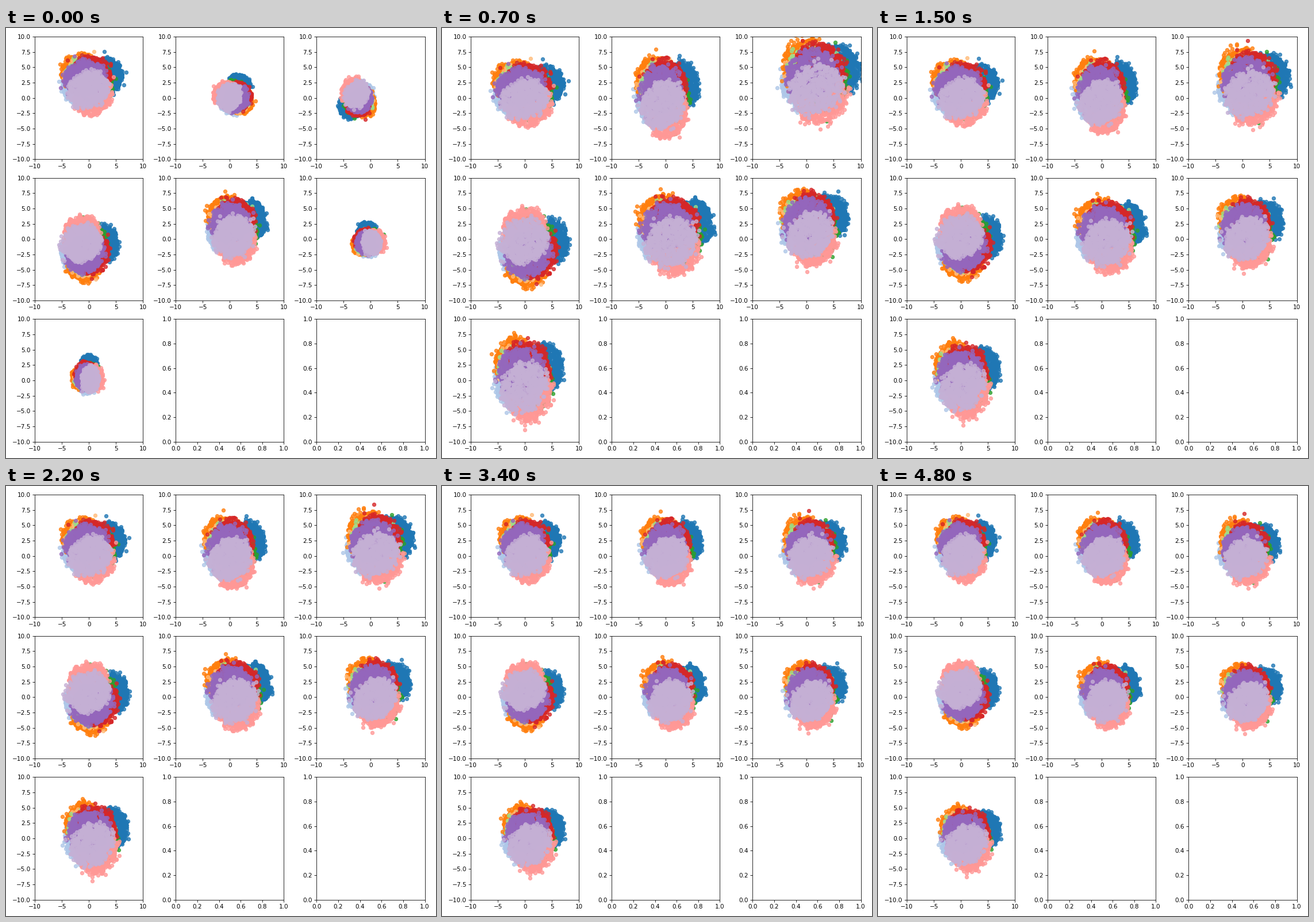
Write a matplotlib script that moves like this. It is 748x748 px and loops after 4900 ms.

```python
import numpy as np
import matplotlib.pyplot as plt
from matplotlib.animation import FuncAnimation

FRAMES, STEP = 49, 100
POINTS = 600
HUB = 0.3
REST_HALF = 5.4 + 5.2j
ANCHORS = np.array([4 + 1.6j, -1.4 - 0.2j, -0.9 + 2.4j, -0.1 + 1.7j,
                    2.2 - 0.3j, 0.4 + 1.6j, 1.3 + 1.8j, 1.5 - 2j,
                    0.1 + 1j, 0.6 - 0.8j])[:, None]

rng = np.random.default_rng(7)
colors = plt.get_cmap("tab20").colors[:len(ANCHORS)]

fig, axes = plt.subplots(3, 3, figsize=(10, 10), dpi=74.8)
for ax in axes.flat[:7]:
    ax.set(xlim=(-10, 10), ylim=(-10, 10))
fig.tight_layout()

panels = []


def make_cloud():
    """Ten fuzzy ellipses, each lying across the line to the hub."""
    shape = (len(ANCHORS), POINTS)
    rho = 0.87 * rng.random(shape) ** 0.55 + 0.075 * rng.exponential(size=shape)
    theta = rng.uniform(0, 2 * np.pi, shape)
    size = np.linspace(0.95, 1.2, len(ANCHORS))[:, None]
    spread = rho * size * (2.4 * np.cos(theta) + 3j * np.sin(theta))
    return ANCHORS + spread * np.exp(1j * np.angle(ANCHORS - HUB))


def orient(z, flip, turn):
    return (z.conj() if flip else z) * np.exp(1j * np.radians(turn))


def fit(v, mid, half):
    low, high = np.quantile(v, (0.001, 0.999))
    return mid + half * (2 * (v - low) / (high - low) - 1)


def place(z, mid, half):
    return fit(z.real, mid.real, half.real) + 1j * fit(z.imag, mid.imag, half.imag)


def add_panel(start_mid, start_half, peak_mid, peak_half,
              first=(False, 0), later=(False, 0)):
    k = len(panels)
    cloud = make_cloud()
    start = place(orient(cloud, *first), start_mid, start_half)
    cloud = orient(cloud, *later)
    peak = place(cloud, peak_mid, peak_half)
    rest = place(cloud, 0.9 + 0.12 * k + 1j * (1 - k / 6), REST_HALF)
    dots = [axes.flat[k].scatter([], [], color=[c], alpha=0.8) for c in colors]
    panels.append((dots, start, peak, rest))


add_panel(0.5 + 2.2j, 5.6 + 4.9j, 0.6 + 0.7j, 6.5 + 5.2j)
add_panel(0.5 + 0.6j, 3.5 + 3.1j, 0.1 + 0.1j, 5.7 + 6.5j, first=(True, 90))
add_panel(-2.5 + 0j, 3.2 + 3.2j, 2.6 + 2.8j, 7.2 + 6.9j, first=(False, 200))
add_panel(0 - 1.5j, 5.2 + 5.2j, 1.5 - 1.3j, 6.3 + 6.3j,
          first=(True, 35), later=(True, 35))
add_panel(1.2 + 1.5j, 5.4 + 5.4j, 1.7 + 0.7j, 6.9 + 6.4j)
add_panel(-0.4 + 0j, 2.9 + 2.7j, 1.3 + 1.9j, 6.1 + 6.1j, first=(False, 75))
add_panel(-0.3 + 1j, 2.8 + 3j, 0.6 + 0.2j, 6.2 + 6.9j, first=(False, 60))


def update(i):
    t = i * STEP / 1000
    early = np.exp(-t / 0.12)
    tail = np.exp(-4.1 / 1.7)
    swell = (np.exp((0.7 - t) / 1.7) - tail) / (1 - tail)
    artists = []
    for dots, start, peak, rest in panels:
        late = rest + (peak - rest) * swell
        pos = late + (start - late) * early
        for dot, z in zip(dots, pos):
            dot.set_offsets(np.column_stack((z.real, z.imag)))
        artists += dots
    return artists


anim = FuncAnimation(fig, update, frames=FRAMES, interval=STEP,
                     repeat=True, repeat_delay=0)
plt.show()
```
